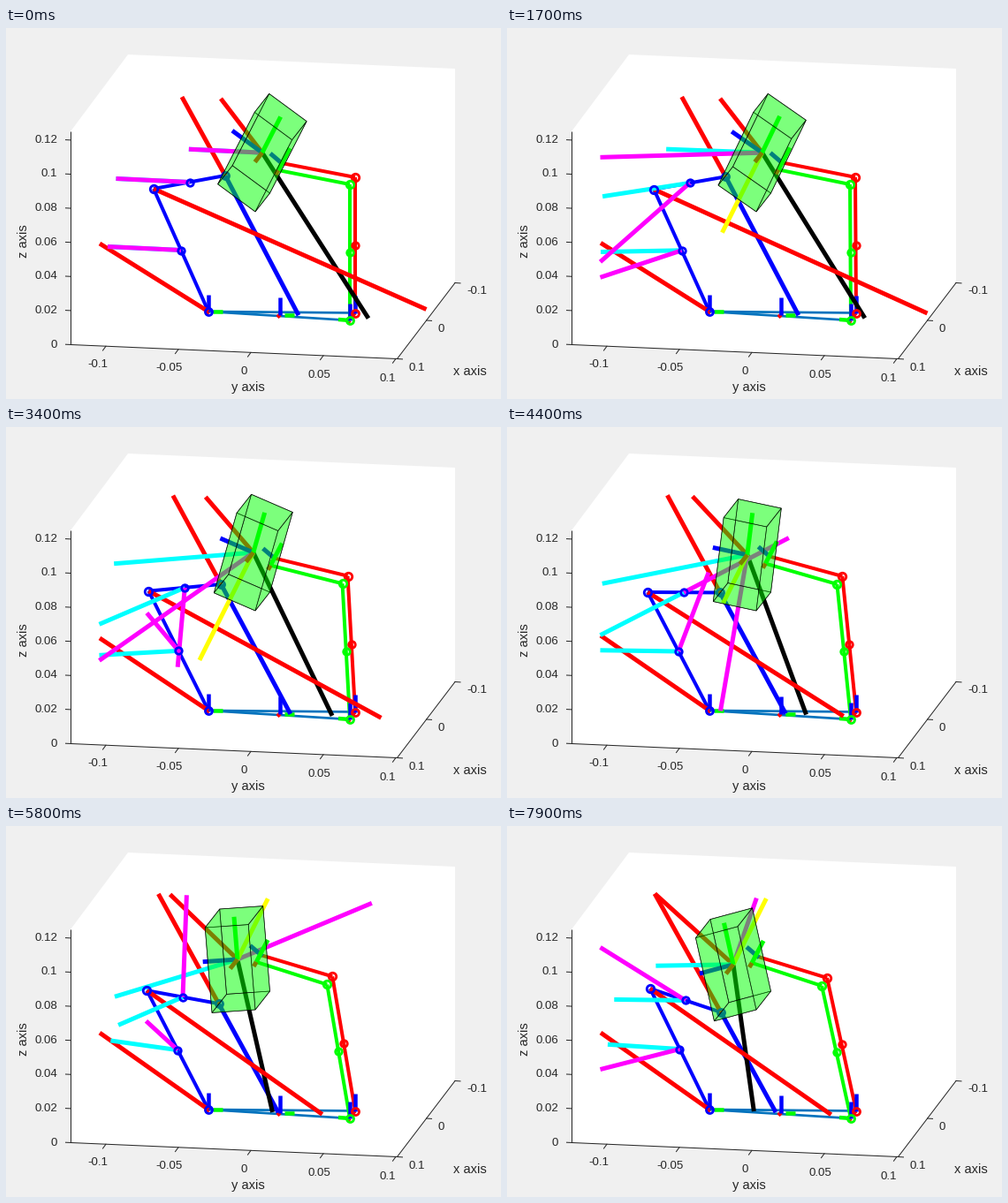
These frames come from a looping animation (560x420 px, 8000 ms). A matplotlib script:

```python
import numpy as np
import matplotlib.pyplot as plt
from matplotlib.animation import FuncAnimation
from matplotlib.patches import Polygon

W, H, DPI = 560, 420, 80
PT = 72 / DPI            # points per pixel
HOLD, FRAMES = 4, 80
T = 81                   # steps of the whole move
SLOPE = 0.0432           # tilt of the y axis on screen
X0, X1, TOP, FLOOR = 105.5, 475.5, 74, 315.5
INK = "#262626"
BLUE, RED, GREEN, TEAL = "#0000ff", "#ff0000", "#00ff00", "#0072bd"
MAGENTA, CYAN, YELLOW = "#ff00ff", "#00ffff", "#ffff00"

BASE_B, BASE_R, BASE_G, ORIGIN = map(
    np.array, ((229, 321), (395, 322.5), (389, 331), (310, 324.5)))
PIVOT, DEPTH = np.array([282, 208]), np.array([16.5, -21])
REST = np.array([-83, -4])   # vector shown at zero speed

plt.rcParams["font.family"] = "Liberation Sans"
fig = plt.figure(figsize=(W / DPI, H / DPI), dpi=DPI, facecolor="#f0f0f0")
ax = fig.add_axes([0, 0, 1, 1])
ax.set(xlim=(0, W), ylim=(H, 0))
ax.axis("off")


# ---------- geometry ----------
def ease(u):
    t = np.clip(u / T, 0, 1)
    return t**3 * (10 - 15 * t + 6 * t * t)


def path(s, a, m, b):
    """Parabola through a, m and b at s = 0, 0.5 and 1."""
    a, m, b = (np.asarray(p, float) for p in (a, m, b))
    return a + (4 * m - 3 * a - b) * s + 2 * (a + b - 2 * m) * s * s


def box_axes(s):
    th = np.radians(30.5 - 45.5 * s)
    c, k = np.cos(th), np.sin(th)
    wide = np.array([49.2 * c, 58 * k + 2.1 * c])
    tall = np.array([-82 * k, 96.5 * c - 3.5 * k])
    return wide, tall


def body(s):
    wide, tall = box_axes(s)
    return PIVOT + (DEPTH - wide - tall) / 2


def elbow(s):
    return path(s, (167, 182), (159, 187), (162, 184))


def wrist(s):
    return path(s, (248, 167), (241, 188), (242, 211))


def forearm(s):
    return (elbow(s) + wrist(s)) / 2


def upper(s):
    return (elbow(s) + BASE_B) / 2


def motion(point, u):
    """Scaled velocity and acceleration of a point."""
    h = 0.5
    p0, p1, p2 = (point(ease(u + d)) for d in (-h, 0, h))
    if u == 0:
        return np.zeros(2), np.zeros(2)
    return 100 * (p2 - p0) / (2 * h), 1e4 * (p2 - 2 * p1 + p0) / h**2


def wall(x, level):
    return np.array([x, level + SLOPE * (x - X0)])


def clip(p, q):
    """End of the segment p-q where it leaves the plot volume."""
    d, k = q - p, 1.0
    if d[0] < 0:
        k = min(k, (X0 - p[0]) / d[0])
    elif d[0] > 0:
        k = min(k, (X1 - p[0]) / d[0])
    rise = d[1] - SLOPE * d[0]
    rel = p[1] - SLOPE * (p[0] - X0)
    if rise < 0:
        k = min(k, (TOP - rel) / rise)
    elif rise > 0:
        k = min(k, (FLOOR - rel) / rise)
    return p + d * k


# ---------- moving parts ----------
def segments(u):
    s = ease(u)
    b, el, wr = body(s), elbow(s), wrist(s)
    wide, tall = box_axes(s)
    r_el = path(s, (395, 169), (379, 169), (362, 172))
    g_el = path(s, (389, 177), (373, 178), (356, 181))
    r_tip = path(s, (312, 153), (297, 146.5), (284, 148))
    g_tip = path(s, (308, 161), (292, 154.5), (277, 155))

    out = [
        (BASE_B, BASE_G, TEAL, 2.7), (BASE_B, BASE_R, TEAL, 2.7),
        (BASE_B, el, BLUE, 4), (el, wr, BLUE, 4),
        (BASE_R, r_el, RED, 4), (r_el, r_tip, RED, 4),
        (BASE_G, g_el, GREEN, 4), (g_el, g_tip, GREEN, 4),
    ]
    for o in (BASE_B, ORIGIN, BASE_R, BASE_G):
        out.append((o, o + (-3, 3), RED, 4.5))
        if o is BASE_G:
            out.append((o, o - (13, 1), GREEN, 4.5))
        elif o is not BASE_R:
            out.append((o + (5, 0), o + (16, 0), GREEN, 4.5))
        out.append((o, o - (0, 19.5), BLUE, 4.5))

    out += [
        (wr, wall(path(s, 331, 315, 304), FLOOR), BLUE, 5),
        (b, wall(path(s, 410, 337, 279), FLOOR), "black", 5),
        (wr, wall(path(s, 199, 181, 167), TOP), RED, 5),
        (b, wall(path(s, 243, 209, 167), TOP), RED, 5),
        (el, clip(el, wall(path(s, 508, 379, 367), FLOOR)), RED, 5),
        (BASE_B, np.array([106, path(s, 244, 236, 234)]), RED, 5),
    ]

    cyan, magenta = [], []
    for point in (body, forearm, upper):
        p = point(s)
        v, a = motion(point, u)
        cyan.append((p, clip(p, p + REST + v), CYAN, 5))
        magenta.append((p, clip(p, p + REST + a), MAGENTA, 5))
    spin = u * (45 - u) * (0.305 - 0.00012 * (u - 36)**2)
    turn = (b, clip(b, b + spin * np.array([-0.45, 0.9])), YELLOW, 5)
    out += cyan + magenta + [turn]

    out += [
        (b, b - 0.8 * wide, BLUE, 5), (b, b - tall / 2, GREEN, 5),
        (b, b - DEPTH / 2, RED, 5),
        (r_tip - (13, 11), r_tip + (1, 1), BLUE, 5),
        (g_tip, g_tip + (13, -25), GREEN, 5),
        (g_tip, g_tip + (-3, 5), RED, 5),
    ]

    joints = [
        (BASE_B, BLUE, 8), (upper(s), BLUE, 7.5), (el, BLUE, 8.5),
        (forearm(s), BLUE, 7.5), (wr, BLUE, 8),
        (BASE_R, RED, 8), ((BASE_R + r_el) / 2, RED, 7.5), (r_el, RED, 8.5),
        (BASE_G, GREEN, 8), ((BASE_G + g_el) / 2, GREEN, 7.5),
        (g_el, GREEN, 8.5),
    ]
    return out, joints


def box_faces(s):
    wide, tall = box_axes(s)
    a = PIVOT - wide - tall
    faces = []
    for p, q, r in ((wide, tall, DEPTH), (wide, DEPTH, tall),
                    (tall, DEPTH, wide)):
        for o in (a, a + r):
            faces.append(np.array([o, o + p, o + p + q, o + q]))
    return faces


# ---------- fixed axes ----------
def stroke(*pts, color=INK, width=1):
    x, y = zip(*pts)
    ax.plot(x, y, color=color, lw=width * PT, zorder=1)


def label(x, y, text, size=13.3, **kw):
    kw = {"ha": "center", "va": "center", **kw}
    ax.text(x, y, text, fontsize=size * PT, color=INK, zorder=1, **kw)


ax.add_patch(Polygon([(73, 117), (138, 30), (508, 46), (508, 289),
                      (443, 374), (73, 358)], fc="white", ec="none", zorder=0))
stroke((73.5, 118), (73.5, 358.5), (442.5, 374.5), (508, 288.5))
for i in range(7):
    y = 358.5 - 38.6 * i
    stroke((73.5, y), (67.5, y - 0.3))
    label(58, y, f"{0.02 * i:g}", ha="right")
for i, text in enumerate(("-0.1", "-0.05", "0", "0.05", "0.1")):
    x = 113 + 82 * i
    y = 358.5 + SLOPE * (x - 73)
    stroke((x, y), (x - 3.5, y + 4.8))
    label((104, 185, 269, 354, 432)[i], 381.5 + 4 * i, text)
for x, y, tx, ty, text in ((442.5, 374.5, 465, 385, "0.1"),
                           (475.5, 331, 492, 341, "0"),
                           (508, 288.5, 533, 298, "-0.1")):
    stroke((x, y), (x + 6, y + 0.4))
    label(tx, ty, text)
label(525, 389, "x axis", 14.6)
label(274, 407, "y axis", 14.6)
label(20, 241, "z axis", 14.6, rotation=90)

# ---------- artists ----------
segs, dots = segments(0)
lines = [ax.plot([], [], color=c, lw=w * PT, solid_capstyle="butt",
                 zorder=3)[0] for _, _, c, w in segs]
rings = [ax.plot([], [], "o", ms=d * PT, mfc="none", mec=c, mew=2.8 * PT,
                 zorder=4)[0] for _, c, d in dots]
faces = [ax.add_patch(Polygon(f, fc=(0, 1, 0, 0.3), ec=(0, 0, 0, 0.8),
                              lw=0.7 * PT, zorder=5)) for f in box_faces(0)]


def draw(n):
    u = max(0, n - HOLD)
    segs, dots = segments(u)
    for ln, (p, q, _, _) in zip(lines, segs):
        ln.set_data([p[0], q[0]], [p[1], q[1]])
    for ring, (p, _, _) in zip(rings, dots):
        ring.set_data([p[0]], [p[1]])
    for face, pts in zip(faces, box_faces(ease(u))):
        face.set_xy(pts)
    return lines + rings + faces


anim = FuncAnimation(fig, draw, frames=FRAMES, interval=100,
                     repeat=True, repeat_delay=0)
plt.show()
```
